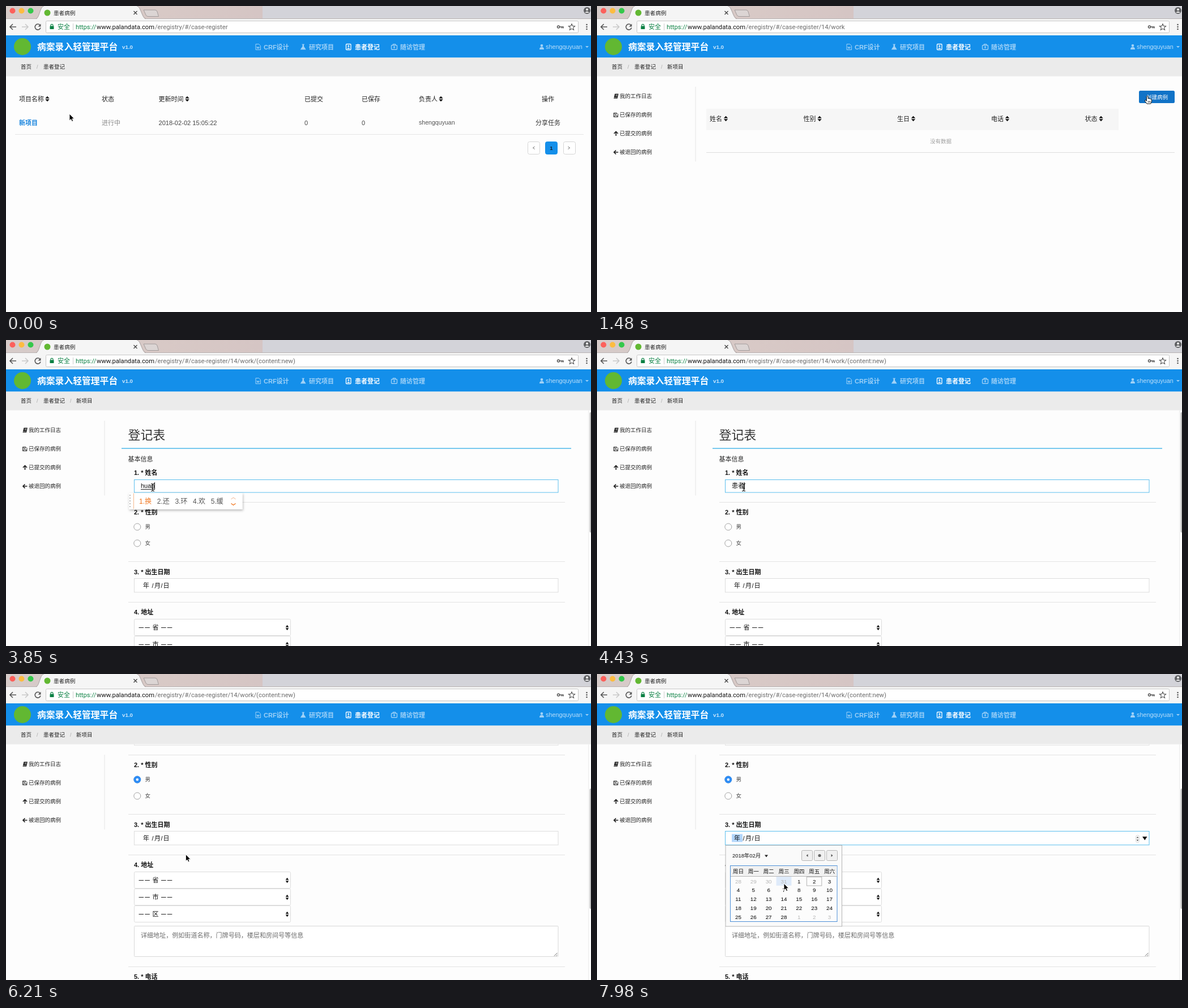
These frames come from a looping animation (1033 by 542 pixels, 8 s). An HTML page:

```html
<!DOCTYPE html>
<html lang="zh-CN">
<head>
<meta charset="utf-8">
<title>患者病例</title>
<style>
html, body { margin: 0; width: 100%; height: 100%; overflow: hidden; background: #fdfdfd; }
svg { display: block; width: 1033px; height: 542px; }
text { font-family: "Liberation Sans", "Noto Sans CJK SC", "Noto Sans CJK", sans-serif; white-space: pre; }
.url { font-family: Roboto, sans-serif; }
</style>
</head>
<body>
<svg id="stage" viewBox="0 0 1033 542" xmlns="http://www.w3.org/2000/svg"></svg>
<script>
const LOOP = 8000;
const USER = 'shengquyuan';
const BLUE = '#148fea';
const GREEN = '#0b8043';
const LOGO = '#62b832';

// ---- drawing helpers; text is placed by its vertical centre ----
const text = (x, cy, s, size = 11, fill = '#111', attrs = '') =>
  `<text x="${x}" y="${(cy + size * .37).toFixed(2)}" font-size="${size}" fill="${fill}" ${attrs}>${s}</text>`;
const rect = (x, y, w, h, fill, attrs = '') =>
  `<rect x="${x}" y="${y}" width="${w}" height="${h}" fill="${fill}" ${attrs}/>`;
const box = (x, y, w, h, stroke, fill = '#fff', r = 0, attrs = '') =>
  rect(x + .5, y + .5, w - 1, h - 1, fill, `stroke="${stroke}" rx="${r}" ${attrs}`);
const path = (d, fill, attrs = '') => `<path d="${d}" fill="${fill}" ${attrs}/>`;
const line = (d, stroke, w = 1, attrs = '') =>
  path(d, 'none', `stroke="${stroke}" stroke-width="${w}" ${attrs}`);
const dot = (x, y, r, fill, attrs = '') => `<circle cx="${x}" cy="${y}" r="${r}" fill="${fill}" ${attrs}/>`;
const group = (id, body, attrs = '') => `<g id="${id}" ${attrs}>${body}</g>`;
const sorter = (x, y, w = 3.7) =>
  path(`M${x - w} ${y - .8}h${2 * w}l${-w} -4zM${x - w} ${y + .8}h${2 * w}l${-w} 4z`, '#111');
const BOLD = 'font-weight="700"', MID = 'font-weight="500"', CENTER = 'text-anchor="middle"';

// ---- browser window ----
function browser() {
  const lights = ['#fc605b', '#fdbc40', '#34c84a'].map((c, i) => dot(11.5 + 16 * i, 8.5, 5, c)).join('');
  return `<linearGradient id="strip"><stop offset="0" stop-color="#d6cbc9"/><stop offset=".6" stop-color="#d8c9c6"/><stop offset="1" stop-color="#d5c5c4"/></linearGradient>`
    + rect(0, 0, 453, 23, 'url(#strip)') + rect(453, 0, 580, 23, '#d3d3d9')
    + rect(0, 22, 1033, 30, '#f5f5f5') + line('M0 22.5H1033', '#b9b3b3')
    + lights
    + path('M53 23.5C59 22 60 0 67 0H231C238 0 240 22 247 23.5Z', '#f5f5f5')
    + line('M53 22.5C59 22 60 0 67 0M231 0C238 0 240 22 247 22.5', '#a9a2a2')
    + dot(73, 12, 5.5, LOGO)
    + text(84, 12, '患者病例', 9.6, '#222')
    + line('M225.5 9l6 6m0-6l-6 6', '#444', 1.3)
    + path('M243 7H263Q266 7 267 10L269.500 18.500H251Q248 18.500 247 16Z', '#dcd5d4', 'stroke="#a39c9c"')
    + dot(1026, 8, 6, '#5f6063') + dot(1026, 6.3, 2, '#eee') + path('M1022 12q4-5 8 0z', '#eee')
    + line('M18 37H7.500M12 32L7 37l5 5', '#555', 1.6)
    + line('M28 37H38.500M34 32l5 5-5 5', '#c9c9c9', 1.6)
    + line('M60 33.800A5 5 0 1 0 61 38.500', '#555', 1.6) + path('M61.500 31.500v5h-5z', '#555')
    + box(70, 26, 941, 22, '#c6c6c6', '#fff', 2)
    + rect(77.5, 35.5, 7, 5.5, GREEN, 'rx=".6"') + line('M79 36v-1.700a2 2 0 0 1 4 0V36', GREEN, 1.2)
    + text(91, 37, '安全', 11, GREEN) + line('M118.500 31V43', '#ccc')
    + text(123, 37, 'https://', 11.2, GREEN, 'class="url"')
    + text(160, 37, 'www.palandata.com', 11.2, '#111', 'class="url"')
    + `<text id="route" class="url" x="263" y="41.200" font-size="11.200" fill="#6c6c6c"></text>`
    + dot(975.5, 37, 2, 'none', 'stroke="#555" stroke-width="1.500"') + line('M978 37h6v2.500M981.500 37v2.500', '#555', 1.5)
    + line('M999 31.700l1.600 3.700 4 .300-3 2.700 1 4-3.600-2.100-3.600 2.100 1-4-3-2.700 4-.300z', '#555', 1.1)
    + [33, 37, 41].map(y => dot(1025.5, y, 1.3, '#555')).join('');
}

// ---- blue bar and breadcrumb ----
function header() {
  const dim = '#9fd1f7';
  return rect(0, 52, 1033, 39.5, BLUE)
    + dot(29, 72, 15, LOGO)
    + text(55, 72, '病案录入轻管理平台', 15.8, '#fff', BOLD)
    + text(205, 72.5, 'v1.0', 9.8, '#c9e5fb', BOLD)
    + line('M441 67.500h5.500l3 3v7h-8.500zM443 72l1 3.500 1.200-3 1.200 3 1-3.500', dim, 1)
    + text(455, 72.5, 'CRF设计', 11, dim, BOLD)
    + path('M522.500 67.500h4.500v1h-1v3l3.700 5.700h-10l3.800-5.700v-3h-1z', dim) + text(535, 72.5, '研究项目', 11, dim, BOLD)
    + rect(600.5, 67.5, 8.5, 10, 'none', 'stroke="#fff" stroke-width="1.300" rx="1"') + dot(604.8, 71, 1.5, '#fff')
    + path('M602 75.800q2.800-4 5.600 0z', '#fff') + text(616, 72.5, '患者登记', 11, '#fff', BOLD)
    + rect(680.5, 69.5, 10, 7.5, 'none', `stroke="${dim}" stroke-width="1.300" rx="1"`)
    + line('M683.500 69v-1.500h4V69M685.500 71v4M683.500 73h4', dim, 1.2) + text(696, 72.5, '随访管理', 11, dim, BOLD)
    + dot(946, 70, 2.3, dim) + path('M942 77q0-4.500 4-4.500t4 4.500z', dim)
    + text(953, 72, USER, 10.8, '#b9defa') + path('M1023 71h6l-3 3z', dim)
    + rect(0, 91.5, 1033, 33, '#ebebeb')
    + text(26, 107.5, '首页', 9.5, '#222') + text(54, 107.5, '/', 9, '#aaa') + text(66, 107.5, '患者登记', 9.5, '#222')
    + group('crumb', text(113, 107.5, '/', 9, '#aaa') + text(124, 107.5, '新项目', 9.5, '#222'));
}

// ---- project list ----
function listPage() {
  const heads = [[23, '项目名称', 73], [169, '状态'], [269.5, '更新时间', 320], [527, '已提交'], [628, '已保存'], [729, '负责人', 768], [946, '操作']];
  const pager = [921, 952, 984].map((x, i) => box(x, 240, 22, 23, i === 1 ? BLUE : '#d5d5d5', i === 1 ? BLUE : '#fff', 3)).join('');
  return heads.map(([x, s, ico]) => text(x, 164.5, s, 11, '#222', MID) + (ico ? sorter(ico, 164.5) : '')).join('')
    + text(23, 206.5, '新项目', 11, '#1683dd', BOLD) + text(169, 206.5, '进行中', 11, '#8a8a8a')
    + text(269.5, 206.5, '2018-02-02 15:05:22', 11.1, '#444')
    + text(527, 206.5, '0', 11, '#444') + text(628, 206.5, '0', 11, '#444')
    + text(729, 206.5, USER, 10.6, '#555') + text(935, 206.5, '分享任务', 11, '#333')
    + line('M16 227.500H1020', '#e6e6e6') + pager
    + line('M933.500 249l-3 2.300 3 2.300M992.500 249l3 2.300-3 2.300', '#666')
    + text(963, 251.5, '1', 9.5, '#123', CENTER + ' ' + BOLD);
}

// ---- side menu ----
function sideMenu() {
  const ink = '#222';
  const items = ['我的工作日志', '已保存的病例', '已提交的病例', '被退回的病例'];
  return line('M174 143V275.500', '#e4e4e4')
    + items.map((s, i) => text(40, 159.5 + 33.1 * i, s, 9.5, ink)).join('')
    + path('M31.500 155.500h6.500l-2 8.500h-6.500z', ink) + line('M33 157.500h3.500M32.600 159.300h3.500M30 162.600h5.500', '#eee', .7)
    + line('M29.500 189.500h5.500l2 2v5h-7.500zM31 189.500v2.500h3v-2.500M31 196.500v-2.500h4.500v2.500', ink, .9)
    + line('M33.500 230v-7M30 226l3.500-3.500 3.500 3.500', ink, 1.7)
    + line('M37.500 259h-7M33.500 255.500L30 259l3.500 3.500', ink, 1.7);
}

// ---- empty case table ----
function workPage() {
  const heads = [[199, '姓名'], [364.5, '性别'], [530, '生日'], [696, '电话'], [861.5, '状态']];
  return rect(193, 182, 728, 38, '#f6f6f6')
    + heads.map(([x, s]) => text(x, 199.5, s, 11, '#222', MID) + sorter(x + 28.5, 199.5)).join('')
    + text(607, 239.5, '没有数据', 9.5, '#a0a0a0', CENTER)
    + line('M193 259.500H1020', '#dedede')
    + rect(957, 150, 63, 22, BLUE, 'id="create" rx="2.500"')
    + text(989, 161, '创建病例', 9.6, '#fff', CENTER + ' ' + MID);
}

// ---- registration form, in unscrolled coordinates ----
function formPage() {
  const label = (y, s) => text(226, y, s, 11, '#111', BOLD);
  const rule = y => line(`M216 ${y}.500H987`, '#e3e3e3');
  const radio = (y, s) => dot(231.8, y, 6, '#fff', 'stroke="#a2a2a2"') + text(245.5, y - 1, s, 9.5, '#444');
  const dashes = (x, y) => text(x, y, '——', 8.6, '#111', 'letter-spacing="2.200" ' + BOLD);
  const select = (y, s) => box(226, y, 277, 30, '#dcdcdc', '#fff', 2)
    + dashes(234.5, y + 15) + text(258.5, y + 15, s) + dashes(274, y + 15) + sorter(496.5, y + 15.5, 2.8);
  return text(215.5, 168, '登记表', 21.9, '#333', 'font-weight="300"')
    + line('M204 192H998', '#4db9ea', 1.6)
    + text(215.5, 211, '基本信息', 11, '#222')
    + label(235, '1. * 姓名') + box(226, 247, 749.5, 23.5, '#ddd', '#fff', 0, 'id="nameBox"')
    + `<text id="typed" x="238" y="262.300" font-size="11" fill="#111"></text>`
    + rect(238, 264, 0, 1, '#222', 'id="underline"') + rect(238, 252, 1, 13, '#111', 'id="caret"')
    + rule(287) + label(305, '2. * 性别') + radio(331, '男') + radio(360, '女')
    + group('picked', dot(231.8, 331, 6.4, '#2f8df5') + dot(231.8, 331, 2.2, '#fff'))
    + rule(392) + label(410.5, '3. * 出生日期') + box(226, 422, 749.5, 25.3, '#ddd', '#fff', 0, 'id="dateBox"')
    + rect(238, 427.5, 19, 14, '#b3d6fb', 'id="yearMark"')
    + text(242, 435, '年') + text(257.5, 435, '/') + text(262, 435, '月') + text(273.5, 435, '/') + text(277.5, 435, '日')
    + group('dateTools', box(951, 429, 7, 14, '#d8d8d8', '#fafafa', 3)
      + path('M952.500 434.500h4l-2-2.500zM952.500 437.500h4l-2 2.500z', '#555') + path('M963 432h8.500l-4.200 6.500z', '#111'))
    + rule(464) + label(482, '4. 地址')
    + ['省', '市', '区'].map((s, i) => select(494 + 30 * i, s)).join('')
    + box(226, 590, 749.5, 55, '#d8d8d8', '#fff', 1)
    + text(238, 606.5, '详细地址，例如街道名称，门牌号码，楼层和房间号等信息', 11.05, '#6c6c6c')
    + line('M968 643.500l5.500-5.500M971.500 643.500l2-2', '#555', .9)
    + rule(662) + label(680, '5. * 电话');
}

// ---- input method popups, one per typed prefix ----
const WORD = 'huanzhe';
const CHOICES = ['和 好 会 很 还', '湖 户 护 呼 胡', '话 花 化 画 华', '换 还 环 欢 缓',
  '患者 换装 环状 幻真 还做', '患者 换着 环绕 还真 欢这', '患者 换着 还这 换 还'];

function popup(words, n) {
  let x = 235, body = '';
  words.split(' ').forEach((w, i) => {
    body += text(x, 286, `${i + 1}.${w}`, 12, i ? '#555' : '#f0761f');
    x += 19.7 + 12 * w.length;
  });
  const right = x + 24;
  return group('ime' + n, rect(217, 271, right - 217, 29, '#fff', 'filter="url(#soft)"')
    + line('M219 274V298', '#bbb', 2, 'stroke-dasharray="2 3"') + line('M225.500 271.500V299', '#f6b98d')
    + body + line(`M${right - 20} 282l4-3 4 3`, '#f3cbb0', 1.1) + line(`M${right - 20} 289.500l4 3 4-3`, '#f0761f', 1.3));
}

// ---- date picker ----
const CAL = { x: 236, y: 359, w: 26.85, h: 15.8 };

function calendar() {
  const mid = c => CAL.x + CAL.w * (c + .5);
  const days = [...Array(35).keys()].map(i => {
    const n = i - 3, out = n < 1 || n > 28;
    const label = n < 1 ? n + 31 : n > 28 ? n - 28 : n;
    return text(mid(i % 7), CAL.y + CAL.h * (Math.floor(i / 7) + .5), label, 9.8, out ? '#b5b5b5' : '#000', CENTER);
  }).join('');
  return box(226.5, 303, 206.5, 144.5, '#b4b4b4', '#fafafa')
    + text(239, 322, '2018年02月', 9.4, '#111', MID) + path('M296 320.500h6l-3 4z', '#222')
    + [361, 383, 405].map(x => box(x, 312, 20, 19, '#b5b5b5', '#f0f0f0', 2)).join('')
    + path('M372.500 319v5l-3-2.500zM413.500 319v5l3-2.500z', '#555') + dot(393, 321.5, 2.6, '#666')
    + box(235, 339, 189.5, 100, '#4c8fd8', '#fcfcfc') + rect(236, 340, 187.5, 19, '#f1f1f1') + line('M236 358.500H424', '#b8b8b8')
    + [...'日一二三四五六'].map((d, i) => text(mid(i), 349.5, '周' + d, 9.6, '#111', CENTER)).join('')
    + rect(0, 0, CAL.w, CAL.h, '#dfebfa', 'id="hover"')
    + rect(370.3, 359.5, 26.5, 15.5, 'none', 'stroke="#b5b5b5"') + days;
}

function pointers() {
  return group('arrow', path('M0 0V12L2.700 9.500 4.500 13.500 6.600 12.600 4.900 8.700H8.500Z', '#000', 'stroke="#fff" stroke-width=".9"'))
    + group('hand', path('M-1.300 1Q0-.800 1.300 1V5Q2.600 4 3.700 5.200 5 4.500 6 5.800 7.600 5.500 7.600 7.500V10L6 14H-.800L-4.200 9.300Q-4.800 7.500-3 7.600L-1.300 9.200Z', '#fff', 'stroke="#111"')
      + line('M1.500 9v3M3.300 9v3M5 9v3', '#111', .7))
    + group('beam', line('M-3-6.500Q0-6.500 0-5 0-6.500 3-6.500M0-5V5M-3 6.500Q0 6.500 0 5 0 6.500 3 6.500M-1.500 1.500h3', '#111', 1.1));
}

const stage = document.getElementById('stage');
stage.innerHTML = `<defs><clipPath id="view"><rect y="124.500" width="1033" height="418"/></clipPath>
  <filter id="soft" x="-10%" y="-20%" width="120%" height="160%"><feDropShadow dx="1" dy="2" stdDeviation="2" flood-opacity=".28"/></filter></defs>`
  + rect(0, 0, 1033, 542, '#fdfdfd') + browser() + header()
  + group('list', listPage()) + group('side', sideMenu()) + group('work', workPage())
  + group('form', group('sheet', formPage()) + line('M1028.500 124V542', '#ececec'), 'clip-path="url(#view)"')
  + rect(1030.5, 128, 4, 213, '#bdbdbd', 'id="thumb" rx="2"')
  + CHOICES.map(popup).join('') + group('cal', calendar()) + group('mouse', pointers());

const el = {};
stage.querySelectorAll('[id]').forEach(n => el[n.id] = n);
const show = (id, on) => el[id].setAttribute('display', on ? 'inline' : 'none');
const set = (id, key, v) => el[id].setAttribute(key, v);

// ---- timing: bursts of [start, end, steps]; the picture holds between them ----
const BURSTS = [[150, 1180, 8], [1330, 2360, 8], [3410, 4430, 8], [4880, 5470, 5], [5770, 6800, 8], [6950, 7980, 8]];
function snap(t) {
  let s = 0;
  for (const [a, b, n] of BURSTS) {
    const dt = (b - a) / (n - 1);
    if (t >= a) s = a + dt * Math.min(n - 1, Math.floor((t - a) / dt + .03));
  }
  return s;
}

// pointer way: time, x, y
const WAY = [[0, 112, 191], [445, 42, 207], [740, 42, 207], [1330, 925, 184], [1478, 972, 159], [1772, 972, 159],
  [2213, 268, 258], [2360, 259, 261], [4733, 259, 261], [5470, 230, 330], [5770, 230, 330], [6212, 317.5, 319.5],
  [6653, 880, 297], [6800, 965, 291], [7098, 965, 291], [7833, 350, 376], [7980, 330, 371]];
function pointerAt(t) {
  const i = Math.max(1, WAY.findIndex(k => k[0] >= t));
  const [a, x, y] = WAY[i - 1], [b, u, v] = WAY[i];
  const k = Math.min(1, (t - a) / (b - a));
  return [x + (u - x) * k, y + (v - y) * k];
}

const inside = (x, y, l, t, r, b) => x >= l && x <= r && y >= t && y <= b;

function draw(t) {
  const s = snap(t), [x, y] = pointerAt(s);
  const page = s < 700 ? 'list' : s < 1700 ? 'work' : 'form';
  const form = page === 'form';
  for (const p of ['list', 'work', 'form']) show(p, p === page);
  show('side', page !== 'list');
  show('crumb', page !== 'list');
  show('thumb', form);
  el.route.textContent = '/eregistry/#/case-register'
    + (page === 'list' ? '' : '/14/work') + (form ? '/(content:new)' : '');

  const scroll = s < 6000 ? 0 : s < 6150 ? 84 : 144;
  set('sheet', 'transform', `translate(0 ${-scroll})`);
  set('thumb', 'y', 128 + scroll * .52);

  // name field
  const keys = s < 3410 ? 0 : Math.round((s - 3410) / 145.7) + 1;
  const typing = keys > 0 && keys <= WORD.length;
  const focus = s >= 2200 && s < 5770;
  const width = typing ? [...WORD.slice(0, keys)].reduce((w, c) => w + (c === 'z' ? 5.5 : 6.12), 0) : keys ? 22 : 0;
  el.typed.textContent = typing ? WORD.slice(0, keys) : keys ? '患者' : '';
  set('underline', 'width', typing ? width : 0);
  set('caret', 'x', Math.round(238 + width));
  const blinkOff = t >= 2810 && t < 3410 || t >= 4880 && t < 5320;
  show('caret', focus && !blinkOff);
  set('nameBox', 'stroke', focus ? '#5cbfee' : '#ddd');
  CHOICES.forEach((_, i) => show('ime' + i, keys === i + 1));

  // gender, date
  show('picked', s >= 5770);
  const open = s >= 7090;
  show('cal', open);
  show('yearMark', open);
  set('dateBox', 'stroke', open ? '#5cbfee' : '#ddd');
  show('dateTools', open || scroll === 144 && inside(x, y, 226, 278, 975, 304));
  const col = Math.floor((x - CAL.x) / CAL.w), row = Math.floor((y - CAL.y) / CAL.h);
  show('hover', open && inside(col, row, 0, 0, 6, 4));
  set('hover', 'x', CAL.x + col * CAL.w);
  set('hover', 'y', CAL.y + row * CAL.h);

  // pointer
  const onButton = page === 'work' && inside(x, y, 957, 150, 1020, 172);
  const onLink = page === 'list' && inside(x, y, 22, 198, 57, 215);
  const kind = onButton || onLink ? 'hand'
    : form && !scroll && inside(x, y, 226, 247, 975, 271) ? 'beam' : 'arrow';
  for (const k of ['arrow', 'hand', 'beam']) show(k, k === kind);
  set('create', 'fill', onButton ? '#1173c7' : BLUE);
  set('mouse', 'transform', `translate(${x.toFixed(1)} ${y.toFixed(1)})`);
}

const begin = performance.now();
function tick() {
  draw((performance.now() - begin) % LOOP);
  requestAnimationFrame(tick);
}
tick();
</script>
</body>
</html>
```
